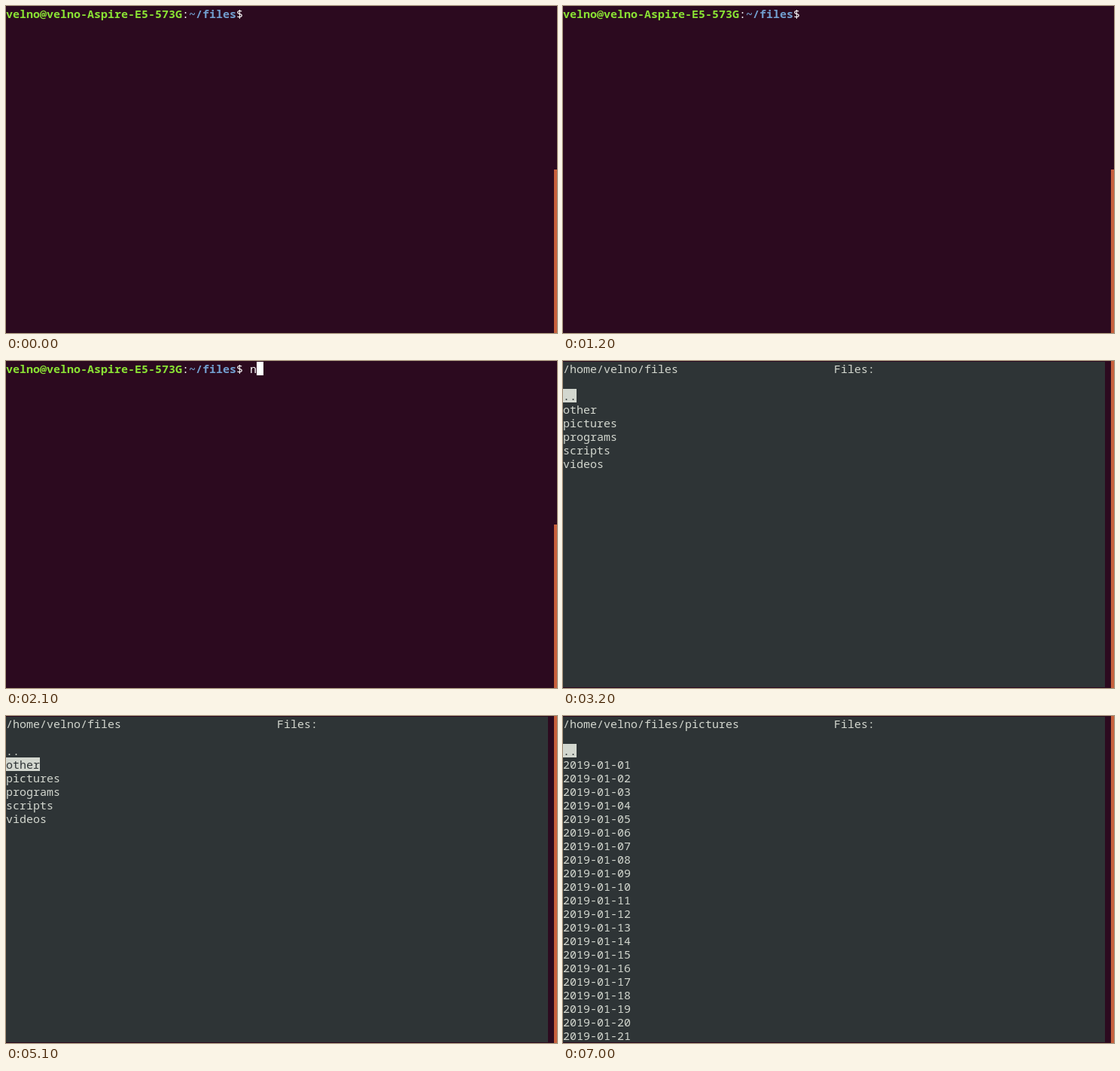
These frames come from a looping animation (732 px wide and 434 px high, 8000 ms). An HTML page with a canvas:

```html
<!DOCTYPE html>
<html lang="en">
<head>
<meta charset="utf-8">
<title>Terminal file navigator</title>
<style>
  html, body { margin: 0; width: 100%; height: 100%; overflow: hidden; background: #2c0a1f; }
  canvas { display: block; }
</style>
</head>
<body>
<canvas id="screen" width="732" height="434"></canvas>
<script>
const ctx = document.getElementById('screen').getContext('2d');
const LOOP = 8000, COL = 9, ROW = 18, TOP = 1;
const FONT = '15px "Noto Sans Mono", "Liberation Mono", monospace';
const SHELL = '#2c0a1f', PANEL = '#2e3436', INK = '#d3d7cf', ORANGE = '#c8603d';

const user = 'velno';
const folders = ['..', 'other', 'pictures', 'programs', 'scripts', 'videos'];
const days = ['..', ...Array.from({ length: 21 }, (_, i) => '2019-01-' + String(i + 1).padStart(2, '0'))];

const keyTimes = [2100, 2200, 2500];                   // when each letter of "nav" appears
const blinkTimes = [400, 1200, 1600, 2800, 2900];      // cursor toggles, starting hidden

const countPassed = (times, t) => times.filter(time => t >= time).length;

function rect(x, y, w, h, color) {
  ctx.fillStyle = color;
  ctx.fillRect(x, y, w, h);
}

function cells(col, row, count, color) {
  rect(col * COL, TOP + row * ROW, count * COL, ROW, color);
}

function text(str, col, row, color, weight = 'normal') {
  ctx.font = weight + ' ' + FONT;
  ctx.fillStyle = color;
  ctx.fillText(str, col * COL, TOP + row * ROW + 15);
}

function drawShell(t) {
  rect(728, 217, 4, 217, ORANGE);
  text(user + '@' + user + '-Aspire-E5-573G', 0, 0, '#8ae234', 'bold');
  text(':', 26, 0, '#fff');
  text('~/files', 27, 0, '#729fcf', 'bold');
  const typed = 'nav'.slice(0, countPassed(keyTimes, t));
  text('$ ' + typed, 34, 0, '#fff');
  if (countPassed(blinkTimes, t) % 2) cells(36 + typed.length, 0, 1, '#fff');
}

function drawNavigator(path, entries, selected) {
  rect(728, 0, 4, 434, ORANGE);
  cells(0, 0, 80, PANEL);
  rect(0, TOP, 80 * COL, 24 * ROW, PANEL);
  text(path, 0, 0, INK);
  text('Files:', 40, 0, INK);
  entries.forEach((name, i) => {
    const active = i === selected;
    if (active) cells(0, i + 2, name.length, INK);
    text(name, 0, i + 2, active ? PANEL : INK);
  });
}

function draw(now) {
  const t = now % LOOP;
  const home = '/home/' + user + '/files';
  rect(0, 0, 732, 434, SHELL);
  if (t < 3200) drawShell(t);
  else if (t < 7000) drawNavigator(home, folders, countPassed([5100, 6000], t));
  else drawNavigator(home + '/pictures', days, 0);
  requestAnimationFrame(draw);
}
requestAnimationFrame(draw);
</script>
</body>
</html>
```
